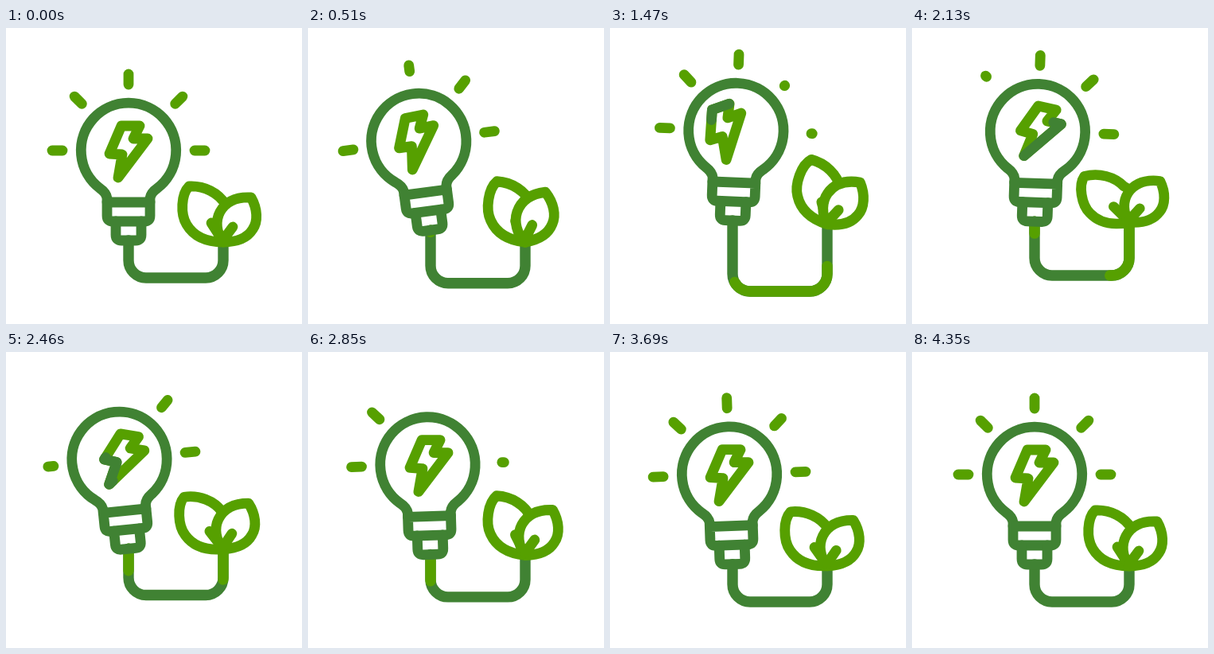
Write an HTML page that moves like this. It is 372x372 px and loops after 5400 ms.

```html
<!DOCTYPE html>
<html lang="en">
<head>
<meta charset="utf-8">
<title>Green energy</title>
<style>
  html, body { margin: 0; width: 100%; height: 100%; overflow: hidden; background: #fff; }
  svg { display: block; width: 100vw; height: 100vh; }
  svg * { stroke-linecap: round; stroke-linejoin: round; }
  .dark, .light { fill: none; stroke-width: 12.8; }
  .dark { stroke: #408233; }
  .light { stroke: #56a000; }
  .solid { fill: #fff; }
  .cable { stroke-width: 13.4; }
</style>
</head>
<body>
<svg viewBox="0 0 372 372">
  <path id="cable" class="dark cable"/>
  <path id="pulse" class="light cable" pathLength="1"/>
  <g id="bulb">
    <path class="dark" d="M127 219V214Q126 207 118 201.5A59.7 59.7 0 1 1 190 201.5Q182 207 181 214V219"/>
    <path class="dark" d="M127 219H181V236Q181 243 174 243H134Q127 243 127 236Z"/>
    <path class="dark" d="M138 243V260Q138 267 145 267H163Q170 267 170 260V243"/>
    <g id="rays" transform="translate(154 154)"></g>
  </g>
  <g id="bolt">
    <path class="light" d="M-9-31H14L6-15H24L-13 34L-8 5L-24 4Z"/>
    <path id="spark" class="dark" pathLength="1" d="M-9-31H14L6-15H24L-13 34L-8 5L-24 4Z"/>
  </g>
  <g id="left">
    <path class="light" d="M-43-70C-53-60-54-35-46-22C-36-5-18 0 0 0C20-12 14-40 3-47C-6-62-24-71-43-70Z"/>
    <path class="light" d="M-15-24L-4-7"/>
  </g>
  <g id="right">
    <path class="light solid" d="M35-56C43-42 44-26 37-16C29-3 15 0 0 0C-9-12-10-27-4-38C4-52 17-57 35-56Z"/>
    <path class="light" d="M12-19L0-3"/>
  </g>
</svg>
<script>
const LOOP = 5400, STEP = 30, FADE = 200;
const $ = id => document.getElementById(id);
const set = (el, attrs) => { for (const k in attrs) el.setAttribute(k, attrs[k]); };
const ramp = (t, from, to) => Math.min(1, Math.max(0, (t - from) / (to - from)));
const ease = (t, from, to) => (1 - Math.cos(Math.PI * ramp(t, from, to))) / 2;
const easeOut = (u, power) => 1 - (1 - u) ** power;

// Sways from rest through the given [time, value] turning points
const sway = (...turns) => t => {
  let value = 0, before = 0;
  for (const [time, next] of turns) {
    value += (next - value) * ease(t, before, time);
    if (t < time) break;
    before = time;
  }
  return value;
};

const bulbTurn = sway([975, -14], [1550, 3], [2000, 3.5], [2500, -6], [3150, 1.5], [3690, -2], [3990, 0]);
const boltTurn = sway([1150, -28], [2200, 13], [2900, 0]);
const leftTurn = sway([1350, 19], [2170, -12], [2850, 5.6], [3600, -2.6], [4350, 0]);
const rightTurn = sway([990, -18], [1650, 12], [2600, -4], [3100, 3], [3690, -2.3], [4350, 0]);
const cableSag = sway([1250, 19], [2500, -8.5], [3480, 0]);
const bulbLift = t => 25 * (ease(t, 0, 1000) - ease(t, 1850, 3850));
const leafLift = t => 25 * (ease(t, 600, 1700) - ease(t, 2000, 3800));

const rays = Array.from({ length: 5 }, (_, i) => {
  const el = document.createElementNS('http://www.w3.org/2000/svg', 'path');
  set(el, { class: 'light', transform: `rotate(${45 * i - 180})` });
  return $('rays').appendChild(el);
});

// Two waves from left to right: each ray slips outwards, then grows back from inside
function drawRay(el, i, t) {
  const blinks = [[1910 + 245 * i, 2350 + 250 * i]];
  if (i > 0) blinks.unshift([430 * i - 230, 770 + 230 * i]);
  const [gone, back] = blinks.find(blink => t < blink[1] + FADE) || blinks.at(-1);
  const from = t < back ? ramp(t, gone - FADE, gone) : 0;
  const to = t < back ? 1 : ramp(t, back, back + FADE);
  set(el, { d: `M${83 + 13 * from} 0H${83 + 13 * to}`, visibility: from < to ? 'visible' : 'hidden' });
}

function drawSegment(el, tail, head) {
  const length = head - tail;
  set(el, {
    'stroke-dasharray': `${length} ${1 - length}`,
    'stroke-dashoffset': -tail,
    visibility: length > .002 ? 'visible' : 'hidden'
  });
}

function draw(t) {
  const turn = bulbTurn(t), angle = turn * Math.PI / 180, foot = 267 - bulbLift(t);
  set($('bulb'), { transform: `translate(0 ${foot - 267}) rotate(${turn} 154 267)` });
  rays.forEach((el, i) => drawRay(el, i, t));

  // The bolt hangs in the glass and drifts a little behind its own turn
  const x = 154 + 113 * Math.sin(angle) + .42 * boltTurn(t - 200);
  const y = foot - 113 * Math.cos(angle);
  set($('bolt'), { transform: `translate(${x} ${y}) rotate(${boltTurn(t)})` });
  drawSegment($('spark'), .93 + ramp(t, 1350, 2750) ** 2, .93 + ramp(t, 1220, 2600));

  const base = 269 - leafLift(t), low = 314 + cableSag(t), bend = low - 22;
  const d = `M154 ${foot}V${bend}A22 22 0 0 0 176 ${low}H251A22 22 0 0 0 273 ${bend}V${base}`;
  set($('cable'), { d });
  set($('pulse'), { d });
  drawSegment($('pulse'), 1.17 * easeOut(ramp(t, 990, 3300), 1.2), 1.17 * easeOut(ramp(t, 500, 3300), 2.75));

  // Leaves grow taller as they fold together
  const left = leftTurn(t), right = rightTurn(t);
  const stem = `translate(273 ${base}) scale(1 ${1 + .0018 * (left - right)})`;
  set($('left'), { transform: `${stem} rotate(${left})` });
  set($('right'), { transform: `${stem} rotate(${right})` });
}

const start = performance.now();
function tick() {
  const t = (performance.now() - start) % LOOP;
  draw(Math.floor(t / STEP) * STEP);
  requestAnimationFrame(tick);
}
tick();
</script>
</body>
</html>
```
